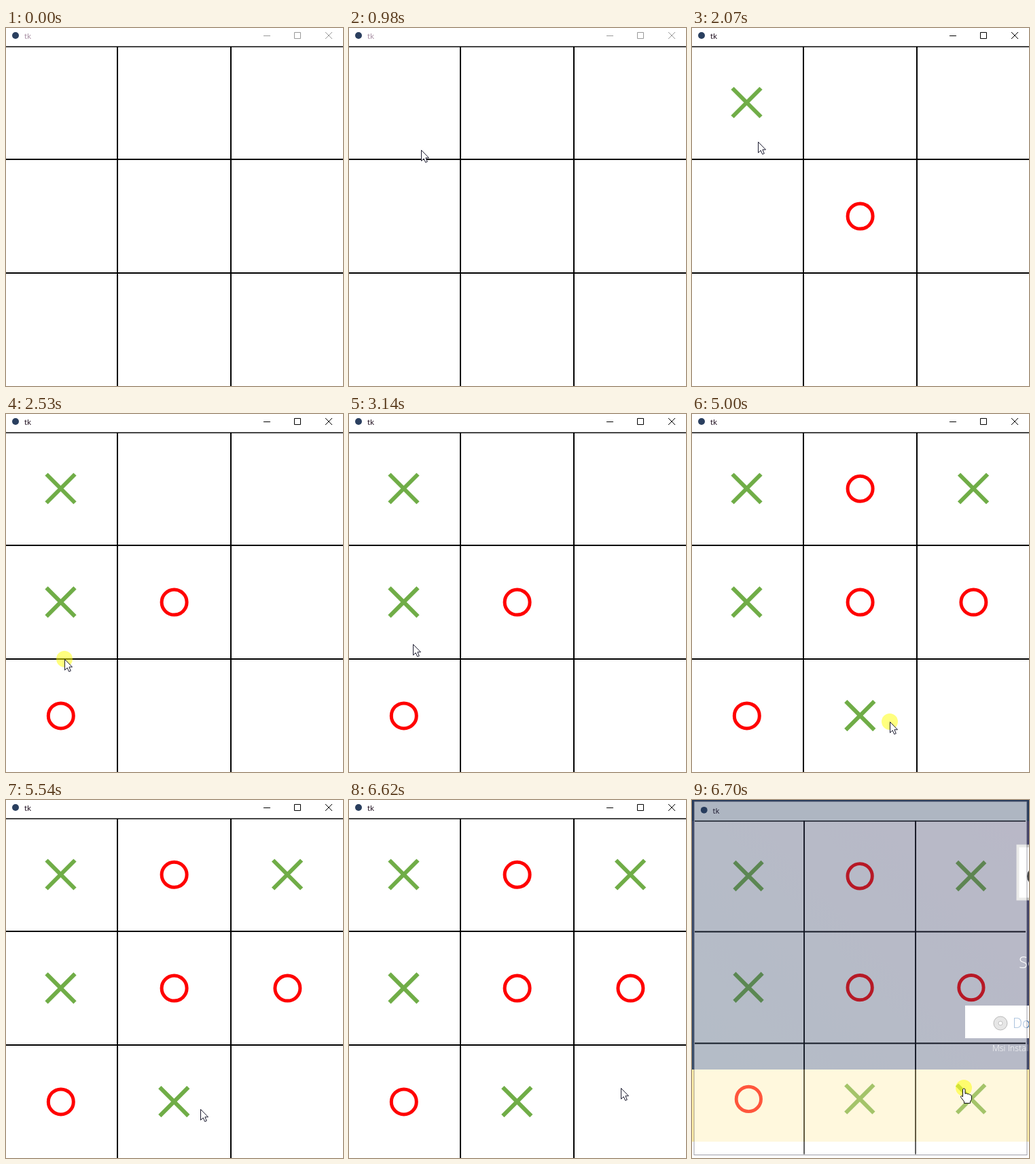
Write an HTML page that moves like this. It is 496 by 526 pixels and loops after 6.77 s.

```html
<!DOCTYPE html>
<html lang="en">
<head>
<meta charset="utf-8">
<title>tk</title>
<style>
  html, body { margin: 0; width: 100%; height: 100%; overflow: hidden; background: #fff; }
  svg { display: block; }
  text { font-family: "Open Sans", "Noto Sans", sans-serif; }
  .grid { stroke: #000; stroke-width: 2; }
  .cross { stroke: #70ad47; stroke-width: 6; fill: #70ad47; }
  .ring { stroke: #f00; stroke-width: 5; fill: none; }
  #title { font-size: 11.5px; }
  #page text { fill: #fff; font-weight: 300; }
</style>
</head>
<body>
<svg width="496" height="526" viewBox="0 0 496 526">
  <defs>
    <linearGradient id="dusk" x1="0" y1="1" x2="1" y2="0">
      <stop offset="0" stop-color="#324d68"/>
      <stop offset="1" stop-color="#423f67"/>
    </linearGradient>
    <g id="X" class="cross">
      <path d="M-21-21 21 21M21-21-21 21"/>
      <circle r="3" stroke="none"/>
    </g>
    <circle id="O" class="ring" r="18.5"/>
  </defs>

  <g id="page">
    <rect width="496" height="526" fill="url(#dusk)"/>
    <rect width="496" height="31" fill="#24395a"/>
    <rect x="479.500" y="67.500" width="40" height="78" fill="#fff" stroke="#c8c8c4" stroke-width="4"/>
    <circle cx="507" cy="112" r="14" fill="#444"/>
    <text x="481" y="247" font-size="24">Setup</text>
    <rect x="402" y="302" width="94" height="48" fill="#fff"/>
    <circle cx="454" cy="328" r="10" fill="#bbb" stroke="#444"/>
    <circle cx="454" cy="328" r="3" fill="#fff" stroke="#555"/>
    <text x="472" y="335" font-size="20" style="fill:#1d5fa8">Download</text>
    <text x="442" y="369" font-size="12.500">Msi Installer</text>
    <rect y="396" width="496" height="106" fill="#ffeca5"/>
    <rect y="502" width="496" height="24" fill="#fff"/>
  </g>

  <g id="window">
    <rect id="sheet" x="-1" y="-2" width="499" height="529" fill="#fff"/>
    <circle cx="14" cy="11" r="5" fill="#2a3f5f"/>
    <text id="title" x="27" y="16">tk</text>
    <path id="buttons" fill="none" d="M379 11.500h10M424.500 6.500h9v9h-9zM470 6l10 10M480 6 470 16"/>
    <path class="grid" d="M0 193H496M0 360H496M164 27V526M331 27V526"/>
    <path d="M0 27.500H496" stroke="#000" stroke-width="1.300"/>
    <g id="marks"></g>
  </g>

  <g id="pointer">
    <circle id="glow" r="12" fill="#ff0" fill-opacity=".5"/>
    <path id="arrow" fill="#fff" stroke="#1c1c30" d="M.5.5V16.300L4.200 12.900 6.700 18.500 9.300 17.400 6.900 11.800H11.500Z"/>
    <path id="hand" fill="#fff" stroke="#111" stroke-linejoin="round"
      d="M-1.500 2Q.2-.5 2 2V8.500Q4 7 5.500 9 7.500 8 8.500 10 11 9.500 11.500 12V17L9.500 20V22.500H.5V20L-4.500 13.500Q-4.500 10.500-1.500 13Z"/>
  </g>
</svg>

<script>
const LOOP = 6770, CLOSE = 6700, FOCUS = 1210, ENTER = 210, GLOW = 150;
const $ = id => document.getElementById(id);

const linear = u => u;
const easeIn = u => u * u;
const easeOut = u => 1 - (1 - u) ** 1.6;
const easeBoth = u => (1 - Math.cos(Math.PI * u)) / 2;

// first change, last change, steps, x, y, easing
const moves = [
  [210, 210, 1, 362, 497, linear],
  [290, 830, 8, 116, 213, easeOut],
  [900, 980, 2, 106, 179, linear],
  [1060, 1060, 1, 100, 162, linear],
  [2070, 2070, 1, 97, 167, linear],
  [2140, 2450, 5, 87, 352, easeBoth],
  [2530, 2600, 2, 86, 364, easeOut],
  [2910, 3140, 4, 94, 338, easeIn],
  [3220, 3530, 5, 394, 165, easeBoth],
  [3600, 3600, 1, 402, 152, linear],
  [4230, 4770, 8, 291, 452, easeBoth],
  [5150, 5150, 1, 290, 453, linear],
  [5300, 5540, 4, 286, 454, linear],
  [6240, 6620, 6, 400, 423, easeBoth]
];

// time of the click, then the marks it brings as shape, column, row
const turns = [
  [FOCUS, "X00", "O11"],
  [2450, "X01", "O02"],
  [3680, "X20", "O10"],
  [5000, "X12", "O21"],
  [CLOSE, "X22"]
];

const marks = turns.flatMap(([time, ...cells]) => cells.map(([shape, col, row]) => {
  const node = document.createElementNS("http://www.w3.org/2000/svg", "use");
  const nudge = shape === "O" ? .3 : 0;
  node.setAttribute("href", "#" + shape);
  node.setAttribute("x", 80.5 + nudge + 166.8 * col);
  node.setAttribute("y", 109.5 + nudge + 166.8 * row);
  $("marks").append(node);
  return { node, time };
}));

function pointerAt(t) {
  let x = 0, y = 0;
  for (const [start, end, steps, toX, toY, ease] of moves) {
    if (t < start) break;
    const pace = end > start ? (t - start) / (end - start) * (steps - 1) : 0;
    const u = ease(Math.min(steps, Math.floor(pace + 1.1)) / steps);
    x += (toX - x) * u;
    y += (toY - y) * u;
  }
  return [Math.round(x), Math.round(y)];
}

const show = (node, on) => node.style.display = on ? "" : "none";

function draw(t) {
  const closing = t >= CLOSE, focused = t >= FOCUS;
  show($("page"), closing);
  show($("buttons"), !closing);
  $("window").setAttribute("opacity", closing ? .63 : 1);
  $("window").setAttribute("transform", closing ? "translate(4 4) scale(.982)" : "");
  $("sheet").setAttribute("stroke", closing ? "#667" : "none");
  $("title").setAttribute("fill", focused ? "#180818" : "#a58ca0");
  $("buttons").setAttribute("stroke", focused ? "#000" : "#999");
  for (const { node, time } of marks) show(node, t >= time);

  show($("pointer"), t >= ENTER);
  show($("arrow"), !closing);
  show($("hand"), closing);
  show($("glow"), turns.some(([time]) => t >= time && t < time + GLOW));
  $("pointer").setAttribute("transform", `translate(${pointerAt(t)})`);
}

const begin = performance.now();
function tick() {
  draw((performance.now() - begin) % LOOP);
  requestAnimationFrame(tick);
}
tick();
</script>
</body>
</html>
```
